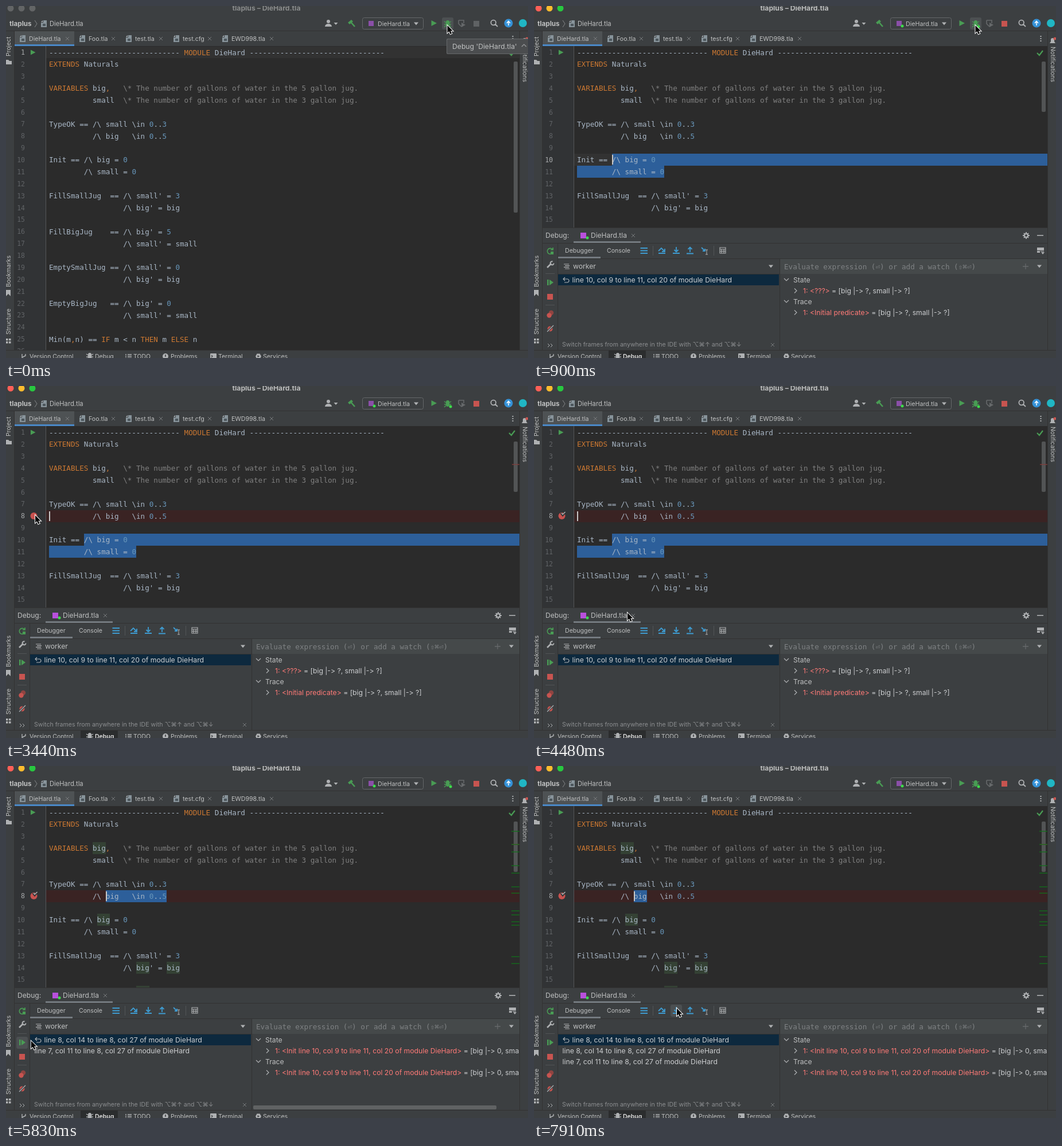
Write an HTML page with a canvas that moves like this. It is 910 px wide and 615 px high and loops after 8000 ms.

```html
<!DOCTYPE html>
<html lang="en">
<head>
<meta charset="utf-8">
<title>TLA+ debugger</title>
<style>
html, body { margin: 0; width: 910px; height: 615px; overflow: hidden; background: #3c3f41; }
canvas { display: block; }
</style>
</head>
<body>
<canvas id="stage" width="910" height="615"></canvas>
<script>
const ctx = document.getElementById('stage').getContext('2d');
const LOOP = 8000, CELL = 7.6, ROW = 20.875, LEFT = 75;
const UI = 'Inter, "DejaVu Sans", sans-serif', MONO = '"DejaVu Sans Mono", monospace';
const PANEL = '#3c3f41', EDGE = '#323232', TEXT = '#bfc0c1', BRIGHT = '#cbcdcf', ICON = '#afb1b3', DIM = '#66696b';
const GREEN = '#499c54', RED = '#c75450', BLUE = '#3e9bd0', HOVER = '#4c5052', SELECT = '#2d5f9a';

const pad = n => ' '.repeat(n);
const code = [
  '-'.repeat(30) + ' MODULE DieHard ' + '-'.repeat(31),
  'EXTENDS Naturals',
  '',
  'VARIABLES big,   \\* The number of gallons of water in the 5 gallon jug.',
  pad(10) + 'small  \\* The number of gallons of water in the 3 gallon jug.',
  '',
  'TypeOK == /\\ small \\in 0..3',
  pad(10) + '/\\ big   \\in 0..5',
  '',
  'Init == /\\ big = 0',
  pad(8) + '/\\ small = 0',
  '',
  "FillSmallJug  == /\\ small' = 3",
  pad(17) + "/\\ big' = big",
  '',
  "FillBigJug    == /\\ big' = 5",
  pad(17) + "/\\ small' = small",
  '',
  "EmptySmallJug == /\\ small' = 0",
  pad(17) + "/\\ big' = big",
  '',
  "EmptyBigJug   == /\\ big' = 0",
  pad(17) + "/\\ small' = small",
  '',
  'Min(m,n) == IF m < n THEN m ELSE n',
  ''
];
const TOKEN = /(\\\*.*)|(\b(?:MODULE|EXTENDS|VARIABLES|IF|THEN|ELSE)\b|,)|(\d+)|[^\\,\d\s]+|\\/g;
const rowY = n => 81 + (n - 1) * ROW;
const colX = n => LEFT + n * CELL;

function rect(x, y, w, h, color, r = 0) {
  ctx.fillStyle = color;
  ctx.beginPath();
  ctx.roundRect(x, y, w, h, r);
  ctx.fill();
}

function disc(x, y, r, color) {
  rect(x - r, y - r, 2 * r, 2 * r, color, r);
}

// Fills the path, or strokes it when a width is given.
function icon(x, y, d, color, width) {
  ctx.save();
  ctx.translate(x, y);
  ctx.fillStyle = ctx.strokeStyle = color;
  ctx.lineWidth = width;
  width ? ctx.stroke(new Path2D(d)) : ctx.fill(new Path2D(d));
  ctx.restore();
}

// y is the middle of the capitals; "->" is split so that it stays two glyphs.
function text(s, x, y, size = 12.2, color = TEXT, { weight = 400, font = UI, align = 0 } = {}) {
  ctx.font = `${weight} ${size}px ${font}`;
  ctx.fillStyle = color;
  x -= align * ctx.measureText(s).width;
  for (const part of s.split(/(?<=-)(?=>)/)) {
    ctx.fillText(part, x, y + size * 0.36);
    x += ctx.measureText(part).width;
  }
  return x;
}

function sideText(s, x, y, turn) {
  ctx.save();
  ctx.translate(x, y);
  ctx.rotate(turn * Math.PI / 2);
  text(s, 0, 0, 10.4);
  ctx.restore();
}

function clipped(x, y, w, h, draw) {
  ctx.save();
  ctx.beginPath();
  ctx.rect(x, y, w, h);
  ctx.clip();
  draw();
  ctx.restore();
}

const cross = (x, y) => icon(x, y, 'M-3-3L3 3M3-3L-3 3', '#777a7c', 1);
const arrowDown = (x, y) => icon(x, y, 'M-4-2.5H4L0 2.5z', ICON);
const play = (x, y, s = 1) => icon(x, y, `M${-4.5 * s}${-5 * s}L${5 * s} 0L${-4.5 * s} ${5 * s}z`, GREEN);

function page(x, y) {
  icon(x, y, 'M-1-6H5V6H-5V-2H-1z', '#87939a');
  icon(x, y, 'M-2-6V-3H-5z', '#b0b8bd');
  rect(x - 2, y, 5, 4, '#4c565c');
}

function bug(x, y, color) {
  icon(x, y, 'M-3-3a3 3 0 0 1 6 0V2a3 3 0 0 1-6 0z', color);
  icon(x, y, 'M-6-4L-3-2M6-4L3-2M-6 1H6M-6 6L-3 3M6 6L3 3', color, 1.4);
}

function titleAndToolbar(t) {
  const active = t >= 450, running = t >= 750;
  const lights = active ? ['#ff5f57', '#febc2e', '#28c840'] : Array(3).fill('#636566');
  lights.forEach((c, i) => disc(8 + 19 * i, 4, 5.5, c));
  text('tlaplus – DieHard.tla', 454, 4, 12.2, active ? '#bcbdbe' : '#8a8c8d', { weight: 700, align: 0.5 });

  text('tlaplus', 6, 31, 11.7, TEXT, { weight: 700 });
  icon(52, 31, 'M-2-6L2 0L-2 6', '#85888a', 1);
  page(66, 31);
  text('DieHard.tla', 76, 31, 11.2);

  disc(562, 27, 3, ICON);
  icon(562, 31, 'M-6 5a6 5 0 0 1 12 0z', ICON);
  icon(575, 31, 'M-3.5-2H3.5L0 2z', ICON);
  icon(602, 30, 'M-6-1L0-6L3-3L-3 2z', GREEN);
  icon(602, 30, 'M-1-2L6 6', GREEN, 2.6);
  ctx.strokeStyle = '#646769';
  ctx.lineWidth = 1;
  ctx.beginPath();
  ctx.roundRect(621.5, 20.5, 106, 20, 3);
  ctx.stroke();
  rect(632, 26, 9, 9, '#8a4fa8');
  text('DieHard.tla', 648, 31, 10.7);
  arrowDown(715, 31);
  play(746, 30);
  if (t < 1800) rect(760, 20, 20, 21, HOVER, 3);
  bug(770, 31, GREEN);
  if (running) [[642, 35], [775, 36]].forEach(([x, y]) => disc(x, y, 2.5, '#3ddc4a'));
  icon(794, 30, 'M-5-5H4V0M-5-5V1L0 6', DIM, 1.6);
  icon(797, 33, 'M-3-4L4 0L-3 4z', DIM);
  rect(815, 26, 10, 10, running ? RED : '#5f6264');
  icon(850, 29, 'M4 0a4.3 4.3 0 1 0-8.6 0a4.3 4.3 0 1 0 8.6 0M3 3L7 7', ICON, 1.8);
  disc(876, 30, 7.5, '#3592d8');
  icon(876, 30, 'M0 4V-3M-3 0L0-3.5L3 0', '#fff', 1.5);
  disc(901, 30, 7, '#20b6c4');
}

function fileTabs() {
  rect(14, 44, 105, 26, '#4e5254');
  rect(14, 67, 105, 3, '#4a88c7');
  [['DieHard.tla', 40, 107], ['Foo.tla', 144, 187], ['test.tla', 225, 270],
   ['test.cfg', 308, 355], ['EWD998.tla', 393, 463]].forEach(([name, x, end]) => {
    page(x - 11, 57);
    text(name, x, 57, 10.6);
    cross(end, 57);
  });
  for (const y of [53, 57, 61]) rect(882.5, y - 1, 2, 2, ICON);
}

function sideBars() {
  rect(14, 44, 1, 558, EDGE);
  rect(895, 44, 1, 558, EDGE);
  sideText('Project', 4, 88, -1);
  icon(5, 98, 'M-6-4H-1L1-2H5V4H-6z', ICON);
  sideText('Bookmarks', 4, 491, -1);
  icon(4, 501, 'M-4-5H4V6L0 2L-4 6z', ICON);
  sideText('Structure', 4, 574, -1);
  for (const [x, y] of [[0, 581], [5, 581], [0, 586], [5, 586]]) rect(x, y, 3.5, 3.5, ICON);
  icon(904, 61, 'M-5 4L-3 1V-2a3 3 0 0 1 6 0V1L5 4z', ICON);
  disc(908, 57, 2.5, RED);
  sideText('Notifications', 905, 71, 1);
}

function bottomBar(opened) {
  rect(0, 602, 910, 13, PANEL);
  rect(0, 601, 910, 1, EDGE);
  if (opened) rect(130, 602, 65, 13, '#2b2d2e');
  icon(31, 612, 'M-3-4V5M3-4V-1L-3 2', ICON, 1.4);
  bug(146, 612, ICON);
  icon(214, 612, 'M-6-3H-4M-2-3H5M-6 0H-4M-2 0H5M-6 3H-4M-2 3H5', ICON, 1.5);
  disc(278, 612, 5, ICON);
  rect(277.2, 609, 1.6, 4, PANEL);
  rect(356, 607, 11, 9, ICON, 1);
  icon(360, 612, 'M-2-2L0 0L-2 2', PANEL, 1.2);
  icon(440, 612, 'M-5 0L-2.5-4.5H2.5L5 0L2.5 5H-2.5z', ICON);
  icon(440, 612, 'M-1.5-2L2 0L-1.5 2z', PANEL);
  [['Version Control', 41], ['Debug', 155], ['TODO', 222], ['Problems', 287], ['Terminal', 370], ['Services', 448]]
    .forEach(([s, x]) => {
      const on = opened && s === 'Debug';
      text(s, x, 612, 10.5, on ? '#e6e6e6' : TEXT, { weight: on ? 600 : 400 });
    });
}

function codeRow(line, n, current) {
  const y = rowY(n);
  text(String(n), 33, y, 11.5, n === current ? '#a7a9ab' : '#606366', { font: MONO, align: 1 });
  for (const m of line.matchAll(TOKEN)) {
    const color = m[1] ? '#808080' : m[2] ? '#cc7832' : m[3] ? '#6897bb' : '#a9b7c6';
    text(m[0], colX(m.index), y, 12.62, color, { font: MONO });
  }
}

// Row backgrounds sit on whole pixels.
function rowBand(row, x, right, color) {
  const top = Math.round(rowY(row) - 10.4);
  rect(x, top, right - x, Math.round(rowY(row + 1) - 10.4) - top, color);
}

const selectCols = (row, from, to, color = SELECT) => rowBand(row, Math.round(colX(from)), Math.round(colX(to)), color);

function editor(t, bottom) {
  const current = t < 900 ? 1 : t < 3290 ? 10 : 8;
  const inTypeOK = t >= 5230, marked = t >= 5380;
  rect(14, 70, 55, bottom - 70, '#313335');
  rect(69, 70, 1, bottom - 70, '#555759');
  rect(70, 70, 825, bottom - 70, '#2b2b2b');
  rowBand(current, 70, 895, EDGE);
  if (t >= 3440) rowBand(8, 70, 895, '#3a2323');
  if (marked) code.forEach((line, i) => {
    if (i !== 7) for (const m of line.matchAll(/\bbig\b/g)) selectCols(i + 1, m.index, m.index + 3, '#344134');
  });
  if (inTypeOK) selectCols(8, 13, t < 7020 ? 27 : 16);
  else if (t >= 900) {
    rowBand(10, 136, 895, SELECT);
    selectCols(11, 0, 20);
  }
  code.forEach((line, i) => codeRow(line, i + 1, current));
  if (t >= 450) {
    const col = t < 900 ? 77 : t < 3290 ? 8 : inTypeOK ? 13 : 0;
    rect(Math.round(colX(col)), Math.round(rowY(current) - 8.5), 2, 17, '#c8c8c8');
  }
  play(47, 81, 0.9);
  if (t >= 3440) disc(48.5, 227, 6, '#c9524f');
  if (t >= 3730) {
    icon(51, 223, 'M-4-1L-1 3L5-4', '#313335', 3.2);
    icon(51, 223, 'M-3-1L-1 1.5L3.5-3', ICON, 1.5);
  }

  rect(885, 97, 7, bottom > 400 ? 264 : 88, '#525455', 2);
  if (t >= 3440) rect(882, 136.5, 13, 1.3, '#843d3a');
  if (marked) for (const y of [114, 137, 150, 174, 187, 211, 222, 253, 260, 272, 278, 333, 345])
    rect(881, y - 0.5, 14, 1.3, '#11701a');
  icon(882, 82, 'M-5 0L-1 4L5-4', GREEN, 2.2);
}

function debugHeader(t, ready) {
  rect(15, 387, 880, 215, PANEL);
  rect(15, 387, 880, 1, EDGE);
  rect(15, 414, 880, 1, EDGE);
  rect(42, 441, 853, 1, EDGE);
  rect(41, 414, 1, 188, EDGE);
  text('Debug:', 20, 401, 12.1);
  rect(81, 396, 10, 10, '#b850dc');
  disc(93, 405, 2.5, '#3ddc4a');
  text('DieHard.tla', 99, 401, 12);
  cross(173, 401);
  rect(69, 411, 117, 3, '#747a80');
  disc(858, 401, 4, ICON);
  icon(858, 401, 'M0-6V6M-6 0H6M-4-4L4 4M4-4L-4 4', ICON, 2);
  disc(858, 401, 2, PANEL);
  rect(877, 400, 11, 1.6, ICON);

  text('Debugger', 54, 427, 10.6);
  text('Console', 127, 427, 10.6);
  ready ? rect(42, 438, 74, 3, '#747a80') : rect(114, 438, 67, 3, '#747a80');
  rect(207, 419, 1, 17, '#515456');
  rect(313, 419, 1, 17, '#515456');
  if (t >= 6870) rect(238, 417, 20, 21, HOVER, 3);
  const step = ready ? BLUE : DIM, calc = ready ? ICON : DIM;
  icon(192, 427.5, 'M-6.5-4.5H6M-6.5 0H6M-6.5 4.5H6', step, 2);
  icon(223, 427, 'M-6 1L-1-4L4 1M5-3V2H0M-6 5H6', step, 1.8);
  icon(248, 427, 'M0-6V2M-3.5-1L0 2.5L3.5-1M-6 5H6', step, 1.8);
  icon(272, 427, 'M0 3V-5M-3.5-2L0-5.5L3.5-2M-6 5.5H6', step, 1.8);
  icon(297, 427, 'M-5-5L1 1M1-3V1H-3', step, 1.8);
  icon(301, 430, 'M-2-4H2M0-4V4M-2 4H2', calc, 1);
  icon(329, 427, 'M-5-5H5V5H-5zM-5-2H5M-2-2V5M2-2V5M-5 1.5H5', calc, 1.2);
  if (!ready) icon(353, 427, 'M-6-3H-2L2 3H6M-6 3H-2L2-3H6M-6 0H6', DIM, 1.2);
  icon(883, 427, 'M-6-5H6V0H-6zM-6 1H-1V4H-6zM0 1H6V2H0z', ICON);
  icon(887, 432, 'M-3-2H3L0 2z', ICON);
}

function debugSide(t, ready) {
  icon(28, 428, 'M4-3a5 5 0 1 0 1 5M5-6V-2H1', GREEN, 1.7);
  rect(29, 429, 5, 5, GREEN);
  icon(28, 452, 'M-5 5L2-2', ICON, 2.6);
  icon(29.5, 450.5, 'M3-4a3 3 0 1 0 2 3', ICON, 2);
  for (const y of [467, 522]) rect(20, y, 16, 1, '#515456');
  if (t >= 4930 && t < 5980) rect(18, 473, 20, 21, HOVER, 3);
  const go = ready ? GREEN : DIM;
  rect(23, 478, 2.5, 10, go);
  icon(30, 483, 'M-3-5L4 0L-3 5z', go);
  rect(23, 503, 10, 10, RED);
  disc(30, 536, 4.2, '#8f4441');
  disc(26.5, 540.5, 4.2, RED);
  disc(28, 564, 4.5, RED);
  icon(28, 564, 'M-5 5L6-6', PANEL, 3.5);
  icon(28, 564, 'M-5 5L6-6', ICON, 1.3);
  icon(28, 593, 'M-4-3L-1 0L-4 3M1-3L4 0L1 3', ICON, 1);
}

function consoleView() {
  const rule = (s, x, y) => {
    text(s, 51, y);
    rect(x, y, 546 - x, 1, '#555759');
  };
  rule('General', 103, 457);
  ['Status:', 'Start:', 'End:'].forEach((s, i) => text(s, 101, 482 + 20 * i, 12.2, TEXT, { align: 1 }));
  rule('States', 95, 548);
  rect(61, 566, 492, 22, '#45494b');
  ['Time', 'Diameter', 'Found', 'Distinct', 'Queue'].forEach((s, i) => {
    text(s, 68 + 98.6 * i, 576.5, 10.6);
    if (i) rect(61 + 98.6 * i, 566, 1, 22, '#565a5c');
  });
  rect(544, 444, 7, 77, '#606263', 2);
  rect(553, 442, 314, 160, '#2b2b2b');
  rect(867, 442, 1, 160, EDGE);
  rect(871, 470, 21, 21, '#56595b', 3);
  icon(881, 456, 'M-6-5H6M-6 0H4a2.5 2.5 0 0 1 0 5H0M2 3L0 5L2 7M-6 5H-3', ICON, 1.4);
  icon(881, 480, 'M-6-4H0M-6 0H0M-6 5H6M3-5V2M0 0L3 3L6 0', ICON, 1.4);
  icon(881, 505, 'M-3-6H3V-3H-3zM-6-2H6V3H-6zM-3 4H3V6H-3z', ICON);
  icon(881, 529, 'M-5-6H5V-4H-5zM-4-3H4V6H-4z', ICON);
}

function debuggerView(t) {
  const of = s => `line ${s} of module DieHard`;
  const init = '10, col 9 to line 11, col 20';
  const frames = t < 5230 ? [init] : ['8, col 14 to line 8, col 27', '7, col 11 to line 8, col 27'];
  if (t >= 7170) frames.unshift('8, col 14 to line 8, col 16');

  icon(57, 455, 'M-5-4H4M-3-1.3H5M-5 1.3H4M-3 4H5', ICON, 1.2);
  text('worker', 68, 455);
  arrowDown(413, 455);
  rect(42, 468, 386, 1, EDGE);
  rect(42, 469, 385, 19, '#0d293e');
  icon(56, 479, 'M-2-5L-5-2L-2 1M-5-2H2a3 3 0 0 1 0 6H-3', ICON, 1.2);
  frames.forEach((s, i) => text(of(s), i ? 49.5 : 66.5, 479 + 19 * i, 12.27, BRIGHT));
  text('Switch frames from anywhere in the IDE with ⌥⌘↑ and ⌥⌘↓', 49, 591.5, 10.6, '#8c8e90');
  cross(416, 592);

  rect(428, 442, 1, 160, EDGE);
  rect(429, 442, 466, 26, '#45494a');
  text('Evaluate expression (⏎) or add a watch (⇧⌘⏎)', 436, 455, 12.62, '#7f8284', { font: MONO });
  icon(857, 455, 'M-5 0H5M0-5V5', DIM, 1.3);
  arrowDown(881, 455);

  const known = t >= 5230, value = known ? '0' : '?';
  const branch = (title, label, y) => {
    icon(440, y - 1, 'M-4-2L0 2L4-2', ICON, 1.2);
    text(title, 452, y);
    icon(456, y + 18.5, 'M-2-4L2 0L-2 4', ICON, 1.2);
    const x = text(`1: <${known ? 'Init ' + of(init) : label}>`, 469, y + 19, 12.18, '#ff7a77');
    text(` = [big |-> ${value}, small |-> ${value}]`, x, y + 19, 12.18, BRIGHT);
  };
  clipped(429, 468, 466, 134, () => {
    branch('State', '???', 479);
    branch('Trace', 'Initial predicate', 517);
  });
  if (known && t < 6420) rect(431, 593, 424, 7, '#606263', 2);
}

function tooltip() {
  rect(768, 57, 150, 27, '#65686a', 2);
  rect(769, 58, 150, 25, '#4b4d4f', 2);
  text("Debug 'DieHard.tla'", 778, 71);
  icon(903, 69, 'M-4 2L0-2L4 2', '#9a9c9e', 1.2);
}

// Pointer legs: start time, number of 150 ms steps, bend, end point.
const legs = [
  [1650, 8, [430, 130], [87, 229]],
  [2840, 3, [65, 232], [51, 226]],
  [4030, 7, [300, 380], [28, 498]],
  [5080, 1, [28, 490], [28, 485]],
  [5830, 8, [138, 452.5], [248.5, 420]],
  [7910, 1, [249, 422], [249, 423.5]]
];

function pointerAt(t) {
  let p = [769.5, 34];
  for (const [start, steps, bend, end] of legs) {
    if (t < start) break;
    const u = Math.min(1, (Math.floor((t - start) / 148.5) + 1) / steps);
    const e = 0.35 * u + 0.65 * u * u * (3 - 2 * u);
    p = p.map((v, i) => (1 - e) ** 2 * v + 2 * e * (1 - e) * bend[i] + e * e * end[i]);
  }
  return p;
}

function pointer(t) {
  const [x, y] = pointerAt(t);
  const arrow = 'M0 0V13L3 10.3L5.2 15.2L7.6 14.1L5.4 9.4H9.4z';
  icon(x, y, arrow, '#fff', 2);
  icon(x, y, arrow, '#000');
}

function render(t) {
  const opened = t >= 600, ready = t >= 900, bottom = opened ? 387 : 601;
  rect(0, 0, 910, 615, PANEL);
  rect(0, 43, 910, 1, EDGE);
  titleAndToolbar(t);
  fileTabs();
  clipped(14, 70, 881, bottom - 70, () => editor(t, bottom));
  sideBars();
  if (opened) {
    debugHeader(t, ready);
    debugSide(t, ready);
    ready ? debuggerView(t) : consoleView();
  }
  bottomBar(opened);
  if (t < 450) tooltip();
  pointer(t);
}

function tick() {
  render(performance.now() % LOOP);
  requestAnimationFrame(tick);
}
tick();
</script>
</body>
</html>
```
